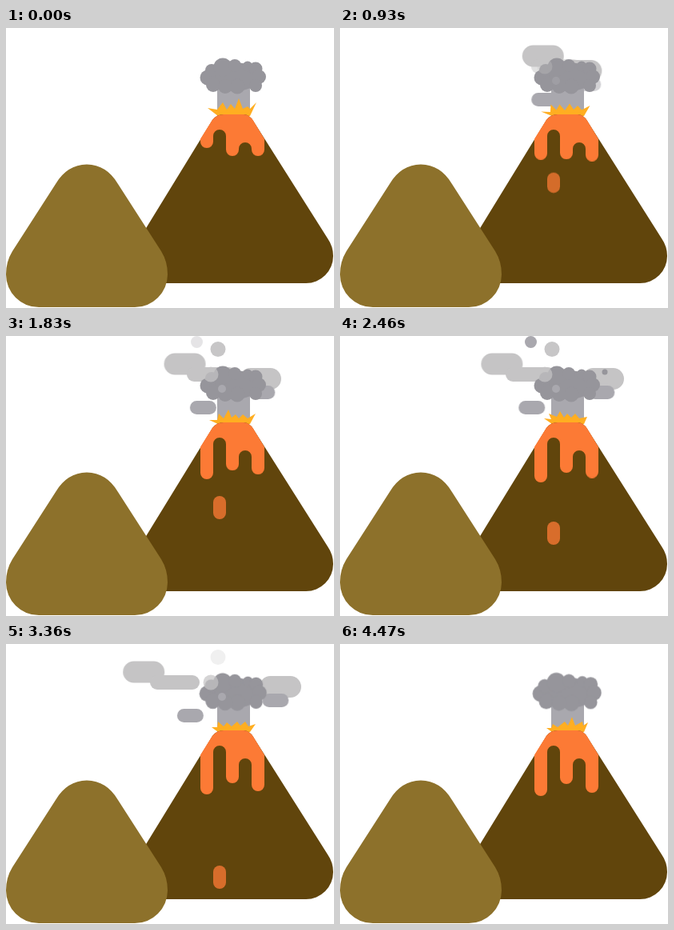
Animation, 410 px wide and 350 px high, one loop 4.5 s. Source, as an HTML page without scripts:

```html
<!DOCTYPE html>
<html lang="en">
<head>
<meta charset="utf-8">
<title>Volcano</title>
<style>
  html, body { margin: 0; width: 100%; height: 100%; overflow: hidden; background: #fff; }
  svg { display: block; width: 410px; height: 350px; }
  svg * { animation: 4.5s linear infinite; }

  .light { fill: #c5c4c5; }
  .mid { fill: #a9a8ae; }
  .dark { fill: #96959b; }
  .lava { fill: #fc7a35; }

  /* Smoke drifting sideways */
  #high { animation-name: high, drift-fade; }
  #low { animation-name: low, late-fade; }
  #right { animation-name: right, drift-fade; }
  #vent { animation-name: vent, drift-fade; }
  #tail { animation-name: tail, late-fade; }
  @keyframes high { to { transform: translateX(-151px); } }
  @keyframes low {
    0% { transform: translateX(4px); }
    29.3% { transform: translateX(-12px); }
    40.7% { transform: translateX(-20px); }
    54.7% { transform: translateX(-39px); }
    74.7% { transform: translateX(-66px); }
    100% { transform: translateX(-100px); }
  }
  @keyframes right {
    29.3% { transform: translateX(26px); }
    54.7% { transform: translateX(46px); }
    74.7% { transform: translateX(60px); }
    100% { transform: translateX(76px); }
  }
  @keyframes vent { to { transform: translateX(-47px); } }
  @keyframes tail { to { transform: translateX(50px); } }
  @keyframes drift-fade { 0%, 100% { opacity: 0; } 12%, 76% { opacity: 1; } 95% { opacity: 0; } }
  @keyframes late-fade { 0%, 14% { opacity: 0; } 27%, 76% { opacity: 1; } 95%, 100% { opacity: 0; } }

  /* Round puffs appearing in place */
  #glow { animation-name: glow; }
  #spot { animation-name: late-fade; }
  #ring { animation-name: ring; }
  #bead { animation-name: bead; }
  #dot { animation-name: dot; }
  @keyframes glow { 0%, 14% { opacity: 0; } 29%, 75% { opacity: .72; } 95%, 100% { opacity: 0; } }
  @keyframes ring { 0%, 30% { opacity: 0; } 40%, 60% { opacity: .95; } 80%, 100% { opacity: 0; } }
  @keyframes bead { 0%, 37% { opacity: 0; } 40.7% { opacity: .3; } 52%, 56% { opacity: 1; } 70%, 100% { opacity: 0; } }
  @keyframes dot { 0%, 44% { opacity: 0; } 53%, 57% { opacity: 1; } 70%, 100% { opacity: 0; } }

  #cloud { transform-origin: 284px 61px; animation-name: swell; }
  @keyframes swell { 0%, 55% { transform: none; } 74.7% { transform: scale(1.02, 1.05); } 100% { transform: scale(1.045, 1.07); } }

  /* Lava */
  #drip1 { animation-name: drip1; }
  #drip2 { animation-name: drip2; }
  #drip3 { animation-name: drip3; }
  @keyframes drip1 {
    12.7% { transform: translateY(9px); }
    40.7% { transform: translateY(29px); }
    54.7% { transform: translateY(33px); }
    74.7% { transform: translateY(38px); }
    100% { transform: translateY(40px); }
  }
  @keyframes drip2 { 54.7% { transform: translateY(11px); } 74.7% { transform: translateY(14px); } 100% { transform: translateY(15px); } }
  @keyframes drip3 { 74.7% { transform: translateY(24px); } 100% { transform: translateY(26px); } }

  #blob { animation-name: fall, blob-fade, stretch; }
  @keyframes fall {
    0% { transform: translateY(-12px); }
    12.7% { transform: none; }
    40.7% { transform: translateY(27px); }
    54.7% { transform: translateY(59px); }
    74.7% { transform: translateY(104px); }
    100% { transform: translateY(112px); }
  }
  @keyframes blob-fade { 0%, 3% { opacity: 0; } 12.7% { opacity: .53; } 22%, 76% { opacity: .78; } 98%, 100% { opacity: 0; } }
  @keyframes stretch { 0%, 12.7% { height: 24px; } 40.7%, 100% { height: 29px; } }

  #flames { fill: #ffae21; animation-name: flicker; }
  @keyframes flicker {
    0% { d: path("M265 110L252 100L264 102L271 93L276 102L281 95L286 101L291 88L296 101L302 98L305 101L313 93L305 110Z"); }
    12.7% { d: path("M265 110L246 105L261 105L263 95L270 103L275 96L281 103L288 92L293 102L298 97L303 103L312 96L305 110Z"); }
    29.3% { d: path("M265 110L257 104L265 105L264 96L271 102L274 95L281 103L286 97L291 102L296 97L301 102L313 98L305 110Z"); }
    40.7% { d: path("M265 110L254 105L264 105L266 97L272 103L278 92L282 102L287 98L291 103L296 98L302 103L312 97L305 110Z"); }
    54.7% { d: path("M265 110L255 103L264 104L261 97L271 101L275 94L280 102L284 97L289 102L294 97L299 103L309 101L305 110Z"); }
    74.7% { d: path("M265 110L257 104L264 104L265 97L272 103L276 98L282 103L289 97L293 102L299 97L303 103L312 100L305 110Z"); }
    99.9% { d: path("M265 110L258 105L264 105L266 100L272 104L281 97L285 102L290 91L294 102L303 97L304 102L310 98L305 110Z"); }
  }
</style>
</head>
<body>
<svg viewBox="0 0 410 350">
  <clipPath id="slope">
    <path d="M243 139L258 115Q263 108 272 108H297Q304 108 309 116L323 139V230H243Z"/>
  </clipPath>

  <g class="light">
    <rect id="right" x="257" y="40" width="52" height="27" rx="13.5"/>
    <rect id="high" x="259" y="21.500" width="52" height="27" rx="13.5"/>
    <rect id="low" x="246" y="39" width="62" height="18" rx="9"/>
    <circle id="ring" cx="265" cy="16.5" r="9.5"/>
  </g>
  <g class="mid">
    <rect id="tail" x="283" y="62" width="33" height="17" rx="8.5"/>
    <rect id="vent" x="249" y="81" width="33" height="17" rx="8.5"/>
    <circle id="bead" cx="238.5" cy="7.5" r="7.5"/>
    <rect x="264" y="70" width="41" height="40"/>
  </g>
  <circle id="dot" class="dark" cx="331" cy="45" r="3.500"/>

  <g id="cloud" class="dark">
    <ellipse cx="284" cy="61" rx="34" ry="18"/>
    <circle cx="252" cy="62" r="9.5"/>
    <circle cx="257" cy="53" r="8"/>
    <circle cx="271" cy="49" r="11.5"/>
    <circle cx="286" cy="47" r="8"/>
    <circle cx="302" cy="48" r="6.5"/>
    <circle cx="312" cy="51" r="8.5"/>
    <circle cx="316" cy="61" r="9"/>
    <circle cx="312" cy="72" r="8"/>
    <circle cx="289" cy="73" r="9.5"/>
    <circle cx="259" cy="71" r="9"/>
    <circle cx="274" cy="73" r="9"/>
  </g>
  <circle id="glow" class="light" cx="256" cy="48" r="9.5"/>
  <circle id="spot" class="mid" cx="270" cy="66" r="5"/>

  <path id="flames" d="M265 110L252 100L264 102L271 93L276 102L281 95L286 101L291 88L296 101L302 98L305 101L313 93L305 110Z"/>

  <path fill="#61450c" d="M150 291L258 115Q263 108 272 108H297Q304 108 309 116L402 263Q409 273 409 285A34 34 0 0 1 375 319H160Z"/>
  <g class="lava" clip-path="url(#slope)">
    <path d="M240 105H326V151H307A8 8 0 0 0 291 151H275V135A8 8 0 0 0 259 135V141H240Z"/>
    <rect id="drip1" x="243" y="60" width="16" height="90" rx="8"/>
    <rect id="drip2" x="275" y="70" width="16" height="90" rx="8"/>
    <rect id="drip3" x="307" y="70" width="16" height="90" rx="8"/>
  </g>
  <rect id="blob" class="lava" x="259" y="173" width="16" height="24" rx="8"/>

  <path fill="#8d712b" d="M62 195Q76 171 101 170.5Q126 171 140 195L194 279Q202 292 202 308A41 41 0 0 1 161 349H41A41 41 0 0 1 0 308Q0 292 8 279Z"/>
</svg>
</body>
</html>
```
